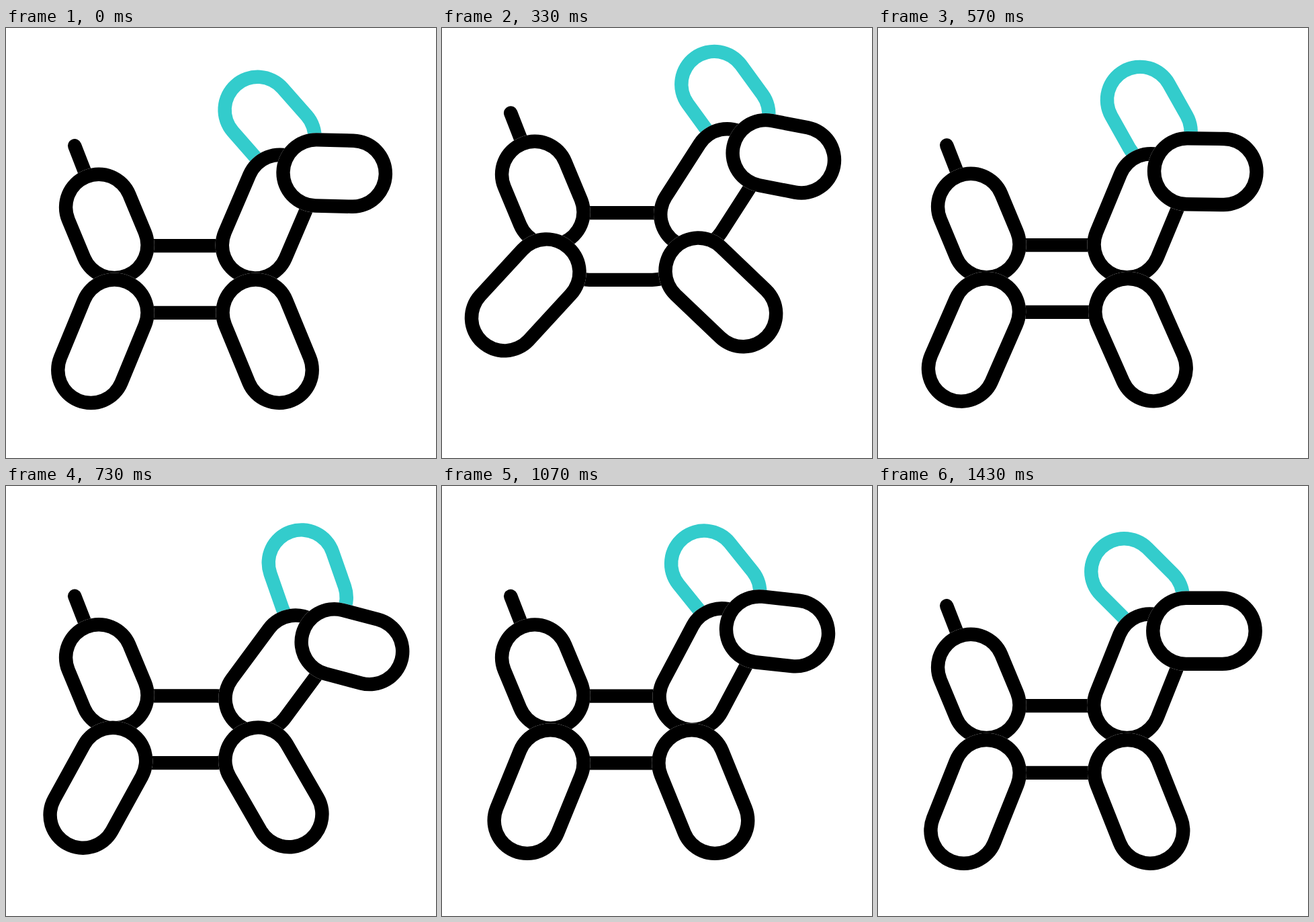
These frames come from a looping animation (640 px wide and 640 px high, 1.67 s). An HTML page:

```html
<!DOCTYPE html>
<html lang="en">
<head>
<meta charset="utf-8">
<title>Balloon dog</title>
<style>
  html, body { margin: 0; height: 100%; overflow: hidden; background: #fff; }
  svg { display: block; width: 100vw; height: 100vh; }
  path { fill: none; stroke-linecap: round; }
</style>
</head>
<body>
<svg viewBox="0 0 640 640"></svg>
<script>
const LOOP = 1670, FRAME = 100 / 3;
const BLACK = '#000', TEAL = '#33cccc';

const line = (d, color, width) =>
  `<path d="${d}" stroke="${color}" stroke-width="${width}"/>`;

// Balloon segment: white backing, coloured skin, white inside
function pill(x1, y1, x2, y2, color = BLACK, outer = 118.5, inner = 77.7) {
  const d = `M${x1} ${y1}L${x2} ${y2}`;
  return line(d, '#fff', outer) + line(d, color, outer) + line(d, '#fff', inner);
}

const group = (id, content) => `<g id="${id}">${content}</g>`;

document.querySelector('svg').innerHTML = group('dog',
  pill(219, 376.9, 313, 376.9, BLACK, 120, 79.5) +
  line('M102.2 178.4L118 219', BLACK, 20.5) +
  pill(138.1, 269.8, 161.5, 326) +
  group('neck',
    group('ear', pill(366.3, 127.3, 404.8, 165.8, TEAL)) +
    pill(404.8, 239.5, 370.3, 326) +
    pill(458.3, 215.8, 512.6, 215.8)) +
  group('hind', pill(161.7, 427, 127.5, 512.7)) +
  group('fore', pill(371.2, 427, 405.2, 512.7)));

// Sine-eased swing from rest to a height and back, times in frames
function swing(f, start, peak, end, height) {
  const u = f < peak ? (f - start) / (peak - start) : (end - f) / (end - peak);
  return height * Math.sin(Math.max(u, 0) * Math.PI / 2) ** 2;
}

const lift = f => swing(f, -1.3, 7.6, 18.9, 58.2) + swing(f, 18.9, 25.2, 38.5, 29.8);

const splay = f => swing(f, -1, 8.35, 19, 22.2) + swing(f, 19, 24.9, 32.9, 13.8) +
                   swing(f, 32.9, 38, 43, 21);

const nod = f => swing(f, -1.2, 5.85, 14.6, 20.3) + swing(f, 15.8, 25.3, 36, 20.2);

const flap = f => swing(f, -1.2, 4.6, 10, 22) + swing(f, 8.5, 10, 11.5, -2) +
                  swing(f, 10, 15, 20.2, 22) + swing(f, 20.2, 23.8, 31, 22);

const part = id => document.getElementById(id);
const turn = (id, angle, x, y) =>
  part(id).setAttribute('transform', `rotate(${angle} ${x} ${y})`);

function pose(f) {
  part('dog').setAttribute('transform', `translate(0 ${-lift(f)})`);
  turn('hind', splay(f), 190, 404.5);
  turn('fore', -1.18 * splay(f), 345.5, 396.7);
  turn('neck', nod(f), 353.8, 348.6);
  turn('ear', flap(f), 441.1, 197);
}

// Stepped at 30 frames per second on a 10 ms clock
function tick() {
  const t = Math.floor(performance.now() % LOOP / 10) * 10;
  pose(Math.floor((t + 4) / FRAME));
  requestAnimationFrame(tick);
}
tick();
</script>
</body>
</html>
```
